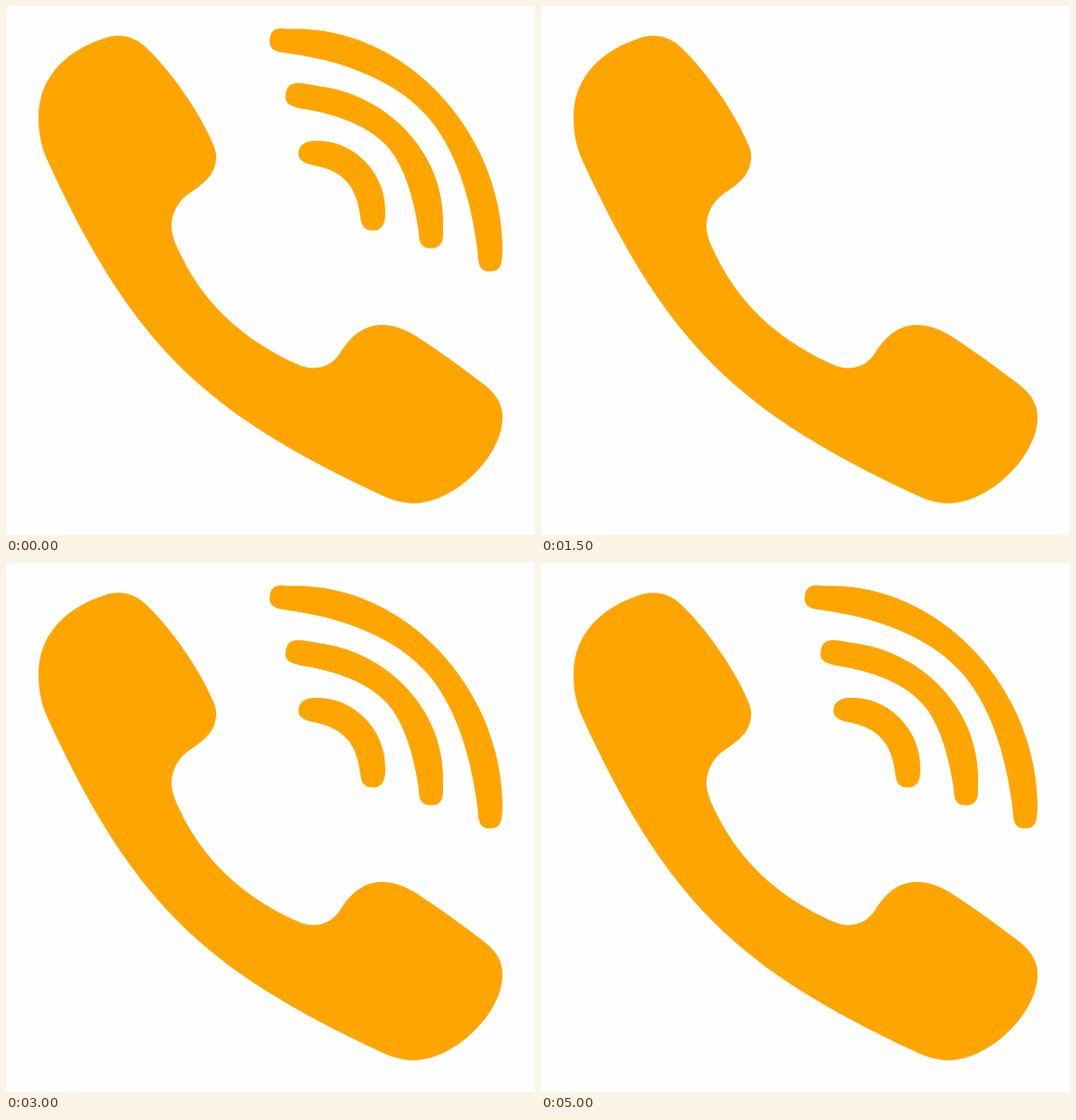
These frames come from a looping animation (569 by 569 pixels, 5.5 s). An HTML page:

```html
<!DOCTYPE html>
<html lang="en">
<head>
<meta charset="utf-8">
<title>Ringing phone</title>
<style>
  html, body { margin: 0; width: 100%; height: 100%; overflow: hidden; background: #fefefe; }
  svg { display: block; width: 100%; height: 100%; fill: #ffa500; }
</style>
</head>
<body>
<svg viewBox="0 0 569 569">
  <path id="handset" d="M120 32 C132 32 142 36 152 46 C177 70 207 112 222 147
    C225 154 226.5 158 226 164 C225 181 214 190 200 199.500 C186 208 178 222 178 237
    C178 246 182 256 187 266 C211 317 252 357 308 383 C315 386 322 389.500 331 389.500
    C343 389 352 384 359 374 C371 354 386 343 404 343 C416 343 428 347 441 355
    C466 371 490 389 514 407 C526 416 534 428 534 441 C536 481 484 535 437 535
    C427 534.500 417 532 408 528 C212 438 135 363 45 167 C38 152 35 137 35 120
    C35 74 68 47 105 35 C110 33 115 32 120 32Z"/>
  <path class="wave" d="M333 145 C376 144 410 182 408 223 C408 236 403 241.500 395 241.500
    C386 241.500 382 237 381 226 C377 193 362 177 330 171 C320 169 314.500 165 314.500 159
    C315 150 321 145 333 145Z"/>
  <path class="wave" d="M314 83 C322 83 328 85 335 86 C412 95 474 161 470 238 L470 246
    C470 257 465 260.500 457 260.500 C448 260.500 444 256 444 243 C439 209 429 172 410 151
    C390 129 357 117 322 111 C307 109 300.500 105 300.500 98 C301 88 305 83 314 83Z"/>
  <path class="wave" d="M297 24 Q303 25 310 24.500 C432 24 534 137 534 263 L533.500 270
    C533 282 529 285.500 520 285.500 C511 285.500 508 280 507.500 266 C502 220 489 163 456 122
    C420 79 360 58 298 50 C288 49 283.500 45 283.500 38 C284 28 288 24 297 24Z"/>
</svg>
<script>
  const STEP = 500;
  // Each step: how many waves show, and the tilt of the handset in degrees.
  const steps = [
    [3, 0], [0, -8], [0, 10], [0, 0], [1, 0], [2, 0],
    [3, 0], [0, 0], [1, 0], [2, 0], [3, 0]
  ];
  const handset = document.getElementById("handset");
  const waves = document.querySelectorAll(".wave");

  function draw(time) {
    const [count, tilt] = steps[Math.floor(time / STEP) % steps.length];
    handset.setAttribute("transform", `rotate(${tilt} 284.5 284.5)`);
    waves.forEach((wave, i) => wave.setAttribute("visibility", i < count ? "visible" : "hidden"));
  }

  const start = performance.now();
  function tick() {
    draw(performance.now() - start);
    requestAnimationFrame(tick);
  }
  tick();
</script>
</body>
</html>
```
